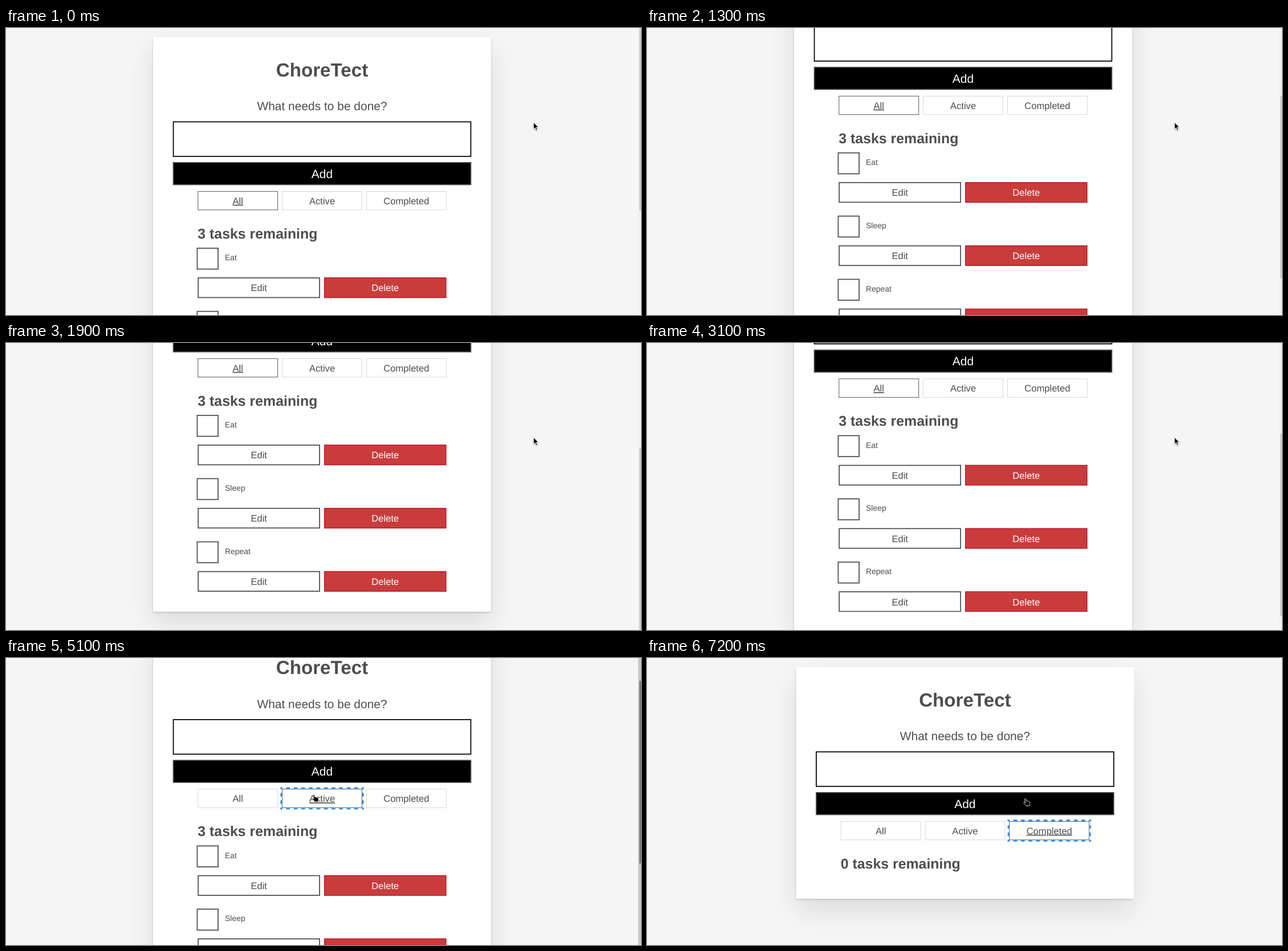
Animation, 1114 px wide and 503 px high, one loop 8000 ms. Source, as an HTML page:

```html
<!DOCTYPE html>
<html lang="en">
<head>
<meta charset="utf-8">
<title>Task list</title>
<style>
@property --scroll { syntax: "<number>"; inherits: true; initial-value: 0; }

html, body { margin: 0; width: 100%; height: 100%; overflow: hidden; background: #f5f5f5; }

#stage {
  position: relative; width: 100%; height: 100%; overflow: hidden;
  animation: scroll 8s step-end infinite;
}
#page {
  position: absolute; left: 0; top: 0; width: 1114px; height: 765px;
  transform: translateY(calc(var(--scroll) * -1px));
}
#shift { position: absolute; inset: 0; animation: shift 8s step-end infinite; }
#card {
  position: absolute; left: 257.8px; top: 16px; width: 593.4px; height: 713.5px;
  background: #fff;
  box-shadow: 0 1.75px 3.5px rgba(0,0,0,.2), 0 21.8px 43.6px rgba(0,0,0,.1);
  animation: shrink 8s step-end infinite;
}
svg { position: absolute; left: 0; top: 0; overflow: visible; }
text {
  font-family: "Liberation Sans", Arial, sans-serif; fill: #4d4d4d;
  text-rendering: geometricPrecision;
}
.pressed text { text-decoration: underline; }

#track, #thumb { position: absolute; right: 0; }
#track { top: 0; left: 1109px; height: 100%; background: #f0f0f0; animation: track 8s step-end infinite; }
#thumb {
  top: 0; left: 1111px; height: 319.5px; background: #cbcbcb;
  transform: translateY(calc(var(--scroll) * .71px));
  animation: thumb 8s step-end infinite;
}

#cursor { width: 12px; height: 15px; animation: move 8s linear infinite; }
#cursor path { stroke: #fff; stroke-width: .9; stroke-linejoin: round; }
#cursor .arrow { filter: drop-shadow(.5px 1px 1px rgba(0,0,0,.35)); }

.all, .active, .completed, .ring-active, .ring-completed, .hand, .arrow {
  animation: 8s step-end infinite;
}
.all { animation-name: until-active; }
.active { animation-name: while-active; }
.completed { animation-name: from-completed; }
.open { animation: until-completed 8s step-end infinite; }
.ring-active { animation-name: ring-active; }
.ring-completed { animation-name: ring-completed; }
.arrow { animation-name: arrow; }
.hand { animation-name: hand; }

@keyframes scroll {
  0% { --scroll: 0; }
  6.25% { --scroll: 20; }
  7.5% { --scroll: 76; }
  8.75% { --scroll: 101.2; }
  15% { --scroll: 115; }
  16.25% { --scroll: 167; }
  17.5% { --scroll: 202.5; }
  21.25% { --scroll: 212; }
  22.5% { --scroll: 243; }
  23.75% { --scroll: 259; }
  38.75% { --scroll: 223.5; }
  40% { --scroll: 170; }
  41.25% { --scroll: 157.8; }
  43.75% { --scroll: 110; }
  45% { --scroll: 56.5; }
  90%, 100% { --scroll: 0; }
}
@keyframes shift { 0% { transform: none; } 90%, 100% { transform: translateX(3.4px); } }
@keyframes shrink { 0% { height: 713.5px; } 90%, 100% { height: 405.5px; } }
@keyframes track {
  0% { background: #f0f0f0; opacity: 1; }
  63.75% { background: #c8c8c8; opacity: 1; }
  90%, 100% { background: #c8c8c8; opacity: 0; }
}
@keyframes thumb {
  0% { background: #cbcbcb; opacity: 1; }
  63.75% { background: #7a7a7a; opacity: 1; }
  90%, 100% { background: #7a7a7a; opacity: 0; }
}
@keyframes until-active { 0% { opacity: 1; } 63.75%, 100% { opacity: 0; } }
@keyframes while-active { 0% { opacity: 0; } 63.75% { opacity: 1; } 90%, 100% { opacity: 0; } }
@keyframes until-completed { 0% { opacity: 1; } 90%, 100% { opacity: 0; } }
@keyframes from-completed { 0% { opacity: 0; } 90%, 100% { opacity: 1; } }
@keyframes ring-active { 0% { opacity: 0; } 62.5% { opacity: 1; } 88.75%, 100% { opacity: 0; } }
@keyframes ring-completed { 0% { opacity: 0; } 88.75%, 100% { opacity: 1; } }
@keyframes arrow { 0% { opacity: 1; } 48.75%, 100% { opacity: 0; } }
@keyframes hand { 0% { opacity: 0; } 48.75%, 100% { opacity: 1; } }
@keyframes move {
  0% { transform: translate(925px, 165px); }
  45% { transform: translate(925px, 165px); animation-timing-function: steps(2); }
  47.5% { transform: translate(850px, 170px); animation-timing-function: steps(3); }
  51.25% { transform: translate(600px, 202px); animation-timing-function: steps(2); }
  53.75% { transform: translate(542.5px, 211px); animation-timing-function: steps(4); }
  58.75% { transform: translate(536.7px, 239px); }
  72.5% { transform: translate(536.7px, 239px); animation-timing-function: steps(5); }
  78.75% { transform: translate(606px, 249px); animation-timing-function: steps(4); }
  83.75% { transform: translate(655.5px, 246.5px); animation-timing-function: steps(2); }
  86.25%, 100% { transform: translate(660.3px, 246px); }
}
</style>
</head>
<body>
<div id="stage">
  <div id="page">
    <div id="shift">
      <div id="card"></div>
      <svg id="app" width="1114" height="765"></svg>
    </div>
  </div>
  <div id="track"></div>
  <div id="thumb"></div>
  <svg id="cursor" viewBox="0 0 12 15">
    <path class="arrow" d="M.5.5V12.3L3.2 9.8L5.2 14.3L7.2 13.4L5.2 9H8.8Z"/>
    <path class="hand" d="M2.2 1.6C2.2.3 4.2.1 4.6 1.4L5.3 4.6C6 4.2 7 4.4 7.3 5.1C8 4.7 9 4.9 9.3 5.7C10.2 5.4 11.2 6 11.3 7L11.5 9.5C11.5 11 10.6 12 10.5 13.2H4.8C4.5 11.8 2.2 10.3 .8 8.3C.1 7.3 1.2 6.3 2.2 7L3.4 7.8Z"/>
  </svg>
</div>
<script>
const INK = '#4d4d4d', THICK = 1.75, THIN = .9;
const MID = 554.5, LEFT = 336.35, GAP = 7;
const TOGGLE = { y: 285.9, w: 140.8, h: 33.3 };
const BUTTON_W = 214.65, ITEM_PITCH = 110.8;

const box = (x, y, w, h, line, stroke, fill = '#fff') =>
  `<rect x="${x + line / 2}" y="${y + line / 2}" width="${w - line}" height="${h - line}"
    fill="${fill}" stroke="${stroke}" stroke-width="${line}"/>`;

const label = (str, x, y, size, { anchor = 'middle', weight = 400, color = INK } = {}) =>
  `<text x="${x}" y="${y}" font-size="${size}" text-anchor="${anchor}"
    font-weight="${weight}" style="fill:${color}">${str}</text>`;

const group = (cls, inner) => `<g class="${cls}">${inner}</g>`;

// Each side starts and ends with half a dash so that the corners join.
function ring(x, y, w, h) {
  const line = 2.6, half = line / 2;
  const side = (len, count, d) => {
    const dash = len / count / 2;
    return `<path d="${d}" fill="none" stroke="#228bec" stroke-width="${line}"
      stroke-dasharray="${dash}" stroke-dashoffset="${dash / 2}"/>`;
  };
  const fullW = w + 2 * line, fullH = h + 2 * line;
  return [y - half, y + h + half].map(v => side(fullW, 11, `M${x - line} ${v}h${fullW}`)).join('') +
    [x - half, x + w + half].map(v => side(fullH, 3, `M${v} ${y - line}v${fullH}`)).join('');
}

function toggle(name, i) {
  const { y, w, h } = TOGGLE, x = LEFT + i * (w + GAP), key = name.toLowerCase();
  const face = stroke => box(x, y, w, h, THIN, stroke) + label(name, x + w / 2, 308.7, 16.58);
  return face('#d3d3d3') + group(`pressed ${key}`, face(INK)) +
    (i ? group(`ring-${key}`, ring(x, y, w, h)) : '');
}

function item(name, i) {
  const y = 385 + i * ITEM_PITCH, right = LEFT + BUTTON_W + GAP;
  const button = (str, x, stroke, fill, color) =>
    box(x, y + 52.1, BUTTON_W, 36.2, THICK, stroke, fill) +
    label(str, x + BUTTON_W / 2, y + 76.4, 16.58, { color });
  return box(334.6, y, 38.4, 38.4, THICK, INK) +
    label(name, 384, y + 22.1, 13.96, { anchor: 'start' }) +
    button('Edit', LEFT, INK, '#fff', INK) +
    button('Delete', right, '#bd2130', '#ca3c3c', '#fff');
}

const heading = n => label(`${n} tasks remaining`, LEFT, 368.7, 24.87, { anchor: 'start', weight: 700 });

document.getElementById('app').innerHTML =
  label('ChoreTect', MID, 84.6, 33.16, { weight: 700 }) +
  label('What needs to be done?', MID, 144.2, 20.94) +
  box(292.7, 163.6, 523.6, 62.3, THICK, '#000') +
  box(292.7, 235, 523.6, 40.4, THICK, INK, '#000') +
  label('Add', MID, 262.7, 20.94, { color: '#fff' }) +
  ['All', 'Active', 'Completed'].map(toggle).join('') +
  group('open', heading(3) + ['Eat', 'Sleep', 'Repeat'].map(item).join('')) +
  group('completed', heading(0));
</script>
</body>
</html>
```
